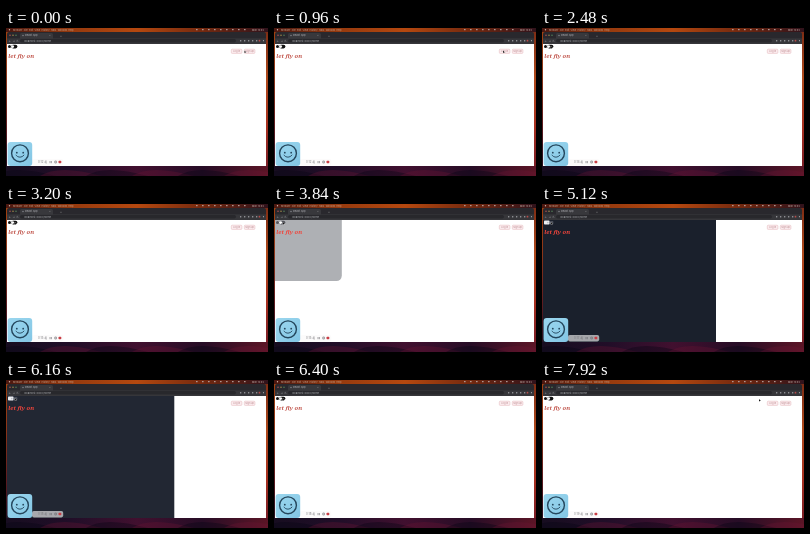
Write an HTML page with a canvas that moves like this. It is 262 px wide and 148 px high and loops after 8000 ms.

```html
<!DOCTYPE html>
<html lang="en">
<head>
<meta charset="utf-8">
<title>Theme switch</title>
<style>
html, body { margin: 0; width: 100%; height: 100%; overflow: hidden; background: #211018; }
canvas { display: block; width: 100vw; height: 100vh; }
</style>
</head>
<body>
<canvas id="stage"></canvas>
<script>
const W = 262, H = 148, LOOP = 8000;
const OPEN_AT = 3793, CLOSE_AT = 6151, SLIDE = 200;
const PAGE = { x: 1, y: 16, w: 259, h: 122 };
const canvas = document.getElementById('stage');
const ctx = canvas.getContext('2d');

const clamp = v => Math.min(1, Math.max(0, v));
const lerp = (a, b, k) => a + (b - a) * k;
const smooth = k => k * k * (3 - 2 * k);

// The CSS "ease" curve, cubic-bezier(.25, .1, .25, 1)
function ease(x) {
  if (x <= 0 || x >= 1) return clamp(x);
  const bez = (a, b, u) => 3 * a * u * (1 - u) ** 2 + 3 * b * u * u * (1 - u) + u ** 3;
  let lo = 0, hi = 1;
  for (let i = 0; i < 20; i++) {
    const mid = (lo + hi) / 2;
    if (bez(.25, .25, mid) < x) lo = mid; else hi = mid;
  }
  return bez(.1, 1, lo);
}

function rect(x, y, w, h, fill) {
  ctx.fillStyle = fill;
  ctx.fillRect(x, y, w, h);
}

function box(x, y, w, h, r, fill, stroke, line = .5) {
  ctx.beginPath();
  ctx.roundRect(x, y, w, h, r);
  if (fill) { ctx.fillStyle = fill; ctx.fill(); }
  if (stroke) { ctx.strokeStyle = stroke; ctx.lineWidth = line; ctx.stroke(); }
}

function dot(x, y, r, fill) {
  ctx.fillStyle = fill;
  ctx.beginPath();
  ctx.arc(x, y, r, 0, Math.PI * 2);
  ctx.fill();
}

function arc(x, y, r, from, to, stroke, line) {
  ctx.beginPath();
  ctx.arc(x, y, r, from, to);
  ctx.strokeStyle = stroke;
  ctx.lineWidth = line;
  ctx.stroke();
}

function label(text, x, y, size, fill, font = 'Inter, sans-serif', style = '') {
  ctx.font = `${style} ${size}px ${font}`;
  ctx.fillStyle = fill;
  ctx.fillText(text, x, y);
}

function gradient(x0, y0, x1, y1, ...colors) {
  const g = ctx.createLinearGradient(x0, y0, x1, y1);
  colors.forEach((c, i) => g.addColorStop(i / (colors.length - 1), c));
  return g;
}

function drawDesktop() {
  rect(0, 0, W, H, gradient(0, 0, 0, H, '#a5420f', '#8c3518', '#5e1c20', '#1c0d20'));
  rect(258, 0, 4, H, gradient(0, 0, 0, H, '#7a2a14', '#b04a1c', '#a83020', '#701a28'));
  rect(0, 138, W, 10, gradient(0, 0, W, 0, '#170d20', '#210e28', '#41102f', '#270d26', '#5c1526'));
  // Folds of the wallpaper below the window
  for (let i = 0; i < 6; i++) {
    const x = i * 46 - 12;
    ctx.fillStyle = i % 2 ? 'rgba(110,20,50,.3)' : 'rgba(8,5,20,.4)';
    ctx.beginPath();
    ctx.moveTo(x, H);
    ctx.quadraticCurveTo(x + 18, 136, x + 62, H);
    ctx.fill();
  }
  rect(0, 0, W, 4, gradient(0, 0, W, 0, '#4a1710', '#963a0e', '#b5480f', '#74290f', '#30121b'));
  dot(3.5, 1.7, .7, '#d0b9ad');
  label('Browser  File  Edit  View  History  Tabs  Window  Help', 7, 2.5, 2.4, '#c9a58f');
  for (let x = 190; x < 244; x += 6) rect(x, 1.1, 1.6, 1.1, '#b9a5a0');
  label('Mon 10:24', 246, 2.5, 2.4, '#c9b5ae');
}

function drawBrowser() {
  box(1, 4, 259, 134, [2, 2, 0, 0], '#29282d');
  box(14, 5, 33, 6, [1.5, 1.5, 0, 0], '#38383c');
  rect(1, 10.3, 259, 5.7, '#36363a');
  ['#b55', '#a88d4a', '#55845a'].forEach((c, i) => dot(4 + i * 3, 7.3, .75, c));
  dot(17, 7.5, .7, '#8c8d94');
  label('React App', 19, 8.4, 2.6, '#b6b6bb');
  label('×', 43, 8.4, 2.6, '#999');
  label('+', 54, 8.5, 3, '#aaa');
  label('←  →  ↻', 2.5, 13.7, 2.6, '#aaabb0');
  box(14, 11, 216, 3.5, 1.7, '#28282c');
  label('localhost:3000/home', 18, 13.6, 2.7, '#aeb0b5');
  for (let x = 234; x < 252; x += 4) box(x, 12, 1.4, 1.4, .4, '#96979c');
  dot(253.5, 12.7, .9, '#b84b49');
  dot(257.5, 12.7, .6, '#a8a8ad');
  rect(PAGE.x, PAGE.y, PAGE.w, PAGE.h, '#fff');
}

function drawPanel(k) {
  if (k <= 0) return;
  ctx.save();
  ctx.beginPath();
  ctx.rect(PAGE.x, PAGE.y, PAGE.w, PAGE.h);
  ctx.clip();
  ctx.globalAlpha = k ** 1.1;
  box(PAGE.x, PAGE.y, 173 * k, 158 * k, [0, 0, 14 * k, 0], '#1a202c');
  ctx.restore();
}

function drawPage(k) {
  const dark = k > .5;
  if (dark) {
    box(2, 16.6, 5.6, 4, .8, '#eceef2');
    box(7.8, 17, 3.6, 3.2, 1, '#4b505c');
    dot(5.8, 18.6, .8, '#b9bdc6');
  } else {
    const ink = k > 0 ? '#55565e' : '#111';
    dot(3.5, 18.6, 1.5, ink);
    box(5.2, 16.8, 6.2, 3.6, 1.8, ink);
    dot(6.6, 18.6, 1.45, '#fff');
  }
  label('let fly on', 2.2, 29.6, 5.9, k > 0 ? '#f0453c' : '#c2574e',
    '"Noto Serif", serif', 'italic 600');
  [[225, 'Log in'], [238, 'Sign up']].forEach(([x, text]) => {
    box(x + .3, 21.2, 10.6, 4.2, .9, '#fbecee', '#e3b4b9', .5);
    ctx.textAlign = 'center';
    label(text, x + 5.6, 24.2, 2.4, '#b57f85');
    ctx.textAlign = 'left';
  });
}

function drawRecorder(t) {
  box(26, 131, 31.2, 6.4, 1.8, 'rgba(250,248,248,.62)');
  label('0:' + String(12 + Math.floor(t / 1000)), 32, 135.2, 2.8, '#77777b');
  ctx.strokeStyle = '#68686d';
  ctx.lineWidth = .6;
  ctx.beginPath();
  ctx.arc(40, 134, 1, .5, 5.5);
  ctx.moveTo(44, 133); ctx.lineTo(44, 135.2);
  ctx.moveTo(45.4, 133); ctx.lineTo(45.4, 135.2);
  ctx.rect(48.8, 133, 1.6, 2);
  ctx.stroke();
  box(52.5, 132.8, 2.8, 2.5, .7, '#c93d44');

  const ink = '#24465c';
  box(1.6, 114, 24.6, 24, 3, gradient(2, 114, 26, 138, '#9ad6ee', '#90cfea', '#82c5e4'));
  ctx.lineCap = 'round';
  arc(14, 125.3, 8.4, 0, Math.PI * 2, ink, 1.4);
  dot(10.8, 124.7, .9, ink);
  dot(17.2, 124.7, .9, ink);
  arc(14, 124.4, 4.8, .6, Math.PI - .6, ink, .9);
  ctx.lineCap = 'butt';
}

// Time, x, y
const pointerPath = [
  [0, 238.5, 22.5], [480, 238.5, 22.5], [900, 229, 22.5], [1500, 229, 22.5],
  [2400, 9, 18], [6400, 9, 18], [7050, 203, 24], [7500, 203, 24], [7920, 217, 19], [LOOP, 217, 19]
];

function drawPointer(t) {
  const i = pointerPath.findIndex(p => p[0] > t);
  const [t0, x0, y0] = pointerPath[i - 1], [t1, x1, y1] = pointerPath[i];
  const k = smooth((t - t0) / (t1 - t0));
  ctx.save();
  ctx.translate(lerp(x0, x1, k), lerp(y0, y1, k));
  ctx.beginPath();
  ctx.moveTo(0, 0);
  ctx.lineTo(0, 2.7);
  ctx.lineTo(.7, 2.1);
  ctx.lineTo(1.9, 2);
  ctx.closePath();
  ctx.strokeStyle = '#fff';
  ctx.lineWidth = .4;
  ctx.stroke();
  ctx.fillStyle = '#161616';
  ctx.fill();
  ctx.restore();
}

function draw(now) {
  const t = now % LOOP;
  const scale = devicePixelRatio || 1;
  const w = Math.round(innerWidth * scale), h = Math.round(innerHeight * scale);
  if (canvas.width !== w || canvas.height !== h) {
    canvas.width = w;
    canvas.height = h;
  }
  ctx.setTransform(w / W, 0, 0, h / H, 0, 0);
  const k = ease((t - OPEN_AT) / SLIDE) - ease((t - CLOSE_AT) / SLIDE);
  drawDesktop();
  drawBrowser();
  drawPanel(k);
  drawPage(k);
  drawRecorder(t);
  drawPointer(t);
  requestAnimationFrame(draw);
}
requestAnimationFrame(draw);
</script>
</body>
</html>
```
